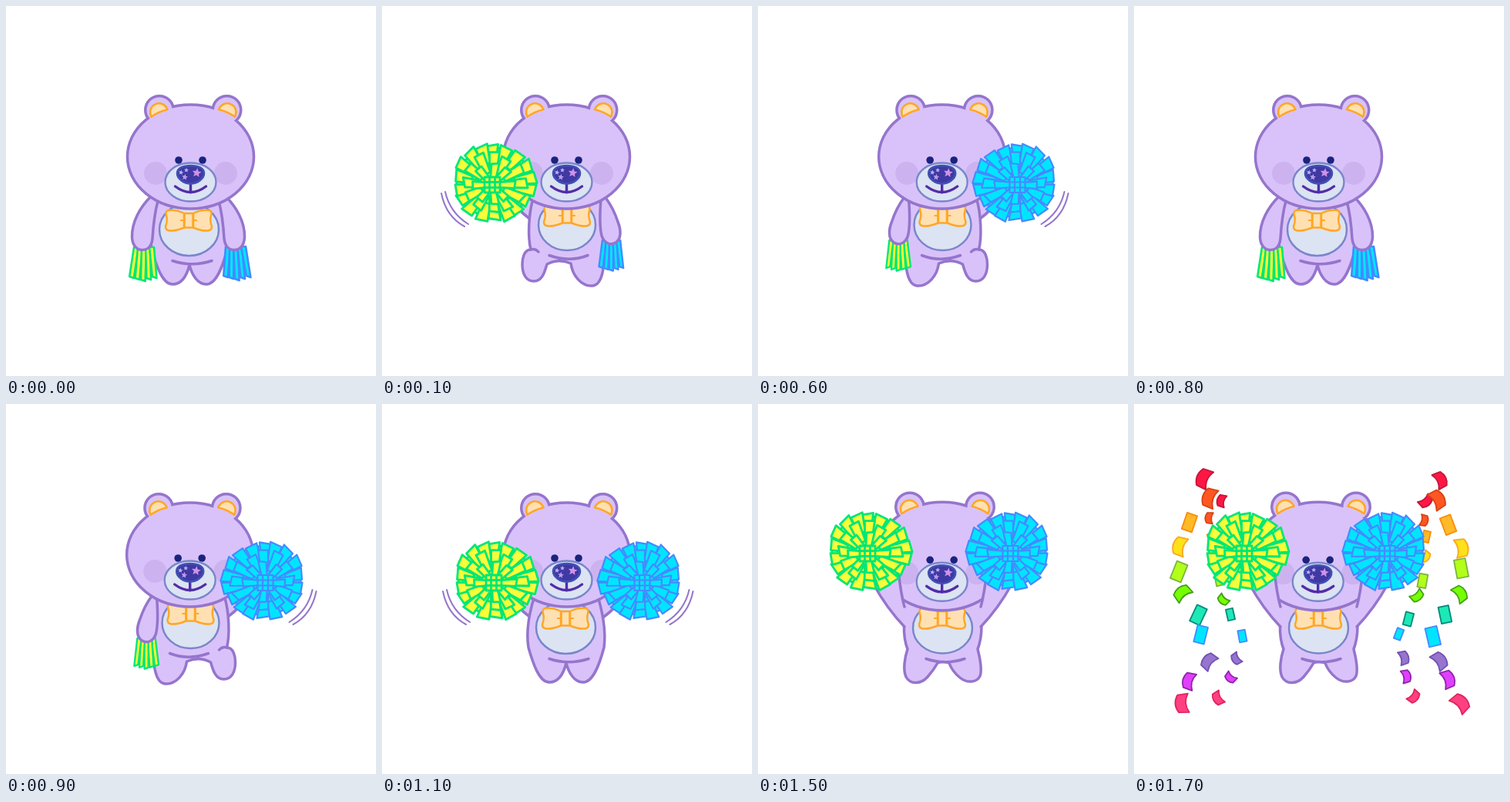
Write an HTML page that moves like this. It is 480x480 px and loops after 2000 ms.

```html
<!DOCTYPE html>
<html lang="en">
<head>
<meta charset="utf-8">
<title>Cheering bear</title>
<style>
html, body { margin: 0; width: 100%; height: 100%; overflow: hidden; background: #fff; }
svg { display: block; width: 100%; height: 100%; }
</style>
</head>
<body>
<svg id="stage" viewBox="0 0 480 480" stroke-linecap="round" stroke-linejoin="round"></svg>
<script>
const FUR = '#d9c2f9', LINE = '#9575cd', CREAM = '#ffe0b2', ORANGE = '#ffa726';
const PALE = '#dce3f2', SLATE = '#7986cb', INK = '#512da8', NAVY = '#1a237e', BLUSH = '#cdb2f0';
const YELLOW = { fill: '#f6fd3a', line: '#00e676', width: 2.8 };
const BLUE = { fill: '#00e5ff', line: '#448aff', width: 2.2 };

const path = (d, fill, line = 'none', w = 3.5) =>
  `<path d="${d}" fill="${fill}" stroke="${line}" stroke-width="${w}"/>`;
const oval = (x, y, rx, ry, fill, line = 'none', w = 3.5) =>
  `<ellipse cx="${x}" cy="${y}" rx="${rx}" ry="${ry}" fill="${fill}" stroke="${line}" stroke-width="${w}"/>`;
const at = (x, y, inner, more = '') => `<g transform="translate(${x} ${y}) ${more}">${inner}</g>`;
const fur = d => path(d, FUR, LINE);
const line = (d, w = 3.5, color = LINE) => path(d, 'none', color, w);
const mirror = (inner, axis = 239.75) => at(axis * 2, 0, inner, 'scale(-1 1)');
const both = (inner, axis) => inner + mirror(inner, axis);
const poly = pts => 'M' + pts.map(p => p.map(v => v.toFixed(1)).join(' ')).join('L') + 'Z';

function seeded(s) {
  return () => (s = (s * 16807) % 2147483647) / 2147483647;
}

// Pompom: three rings of paper strips, outermost first, and a small grid
const pomPaths = (() => {
  const rand = seeded(77), out = [];
  const spot = (a, r, side) => {
    const x = Math.cos(a) * r - Math.sin(a) * side;
    const y = Math.sin(a) * r + Math.cos(a) * side;
    return [x + r * .045, y * .95 - r * .06];
  };
  const ring = (n, r0, r1, w0, w1, vary) => {
    for (let i = 0; i < n; i++) {
      const a = (i + (rand() - .5) * .3) / n * 2 * Math.PI - Math.PI / 2;
      const end = r1 + (rand() - .5) * vary, slant = (rand() - .5) * vary * .5;
      out.push(poly([spot(a, r0, -w0), spot(a, end + slant, -w1), spot(a, end - slant, w1), spot(a, r0, w0)]));
    }
  };
  ring(18, 28, 53, 5, 8, 6);
  ring(12, 16, 40, 4.5, 6.5, 6);
  ring(8, 8, 27, 3.5, 5, 4);
  out.push('M-10-10H10V10H-10ZM-3.5-10V10M3.5-10V10M-10-3.5H10M-10 3.5H10');
  return out;
})();

function pom(x, y, c, flip) {
  const strips = pomPaths.map(d => path(d, c.fill, c.line, c.width)).join('');
  return at(x, y, oval(2, -3, 48, 45, c.fill, c.line, c.width) + strips, flip ? 'scale(-1 1)' : '');
}

function tassel(x, y, c, lean = 0, size = 1) {
  let strips = '';
  for (let k = -2; k <= 2; k++) {
    const top = k * 5, end = k * 7.4 + lean, h = 43 - Math.abs(k) * 2;
    strips += path(poly([[top - 3, 0], [end - 3, h - 1], [end + 2.6, h + 1], [top + 3, 0]]), c.fill, c.line, 2.6);
  }
  return at(x, y, strips, `scale(${size})`);
}

function star(x, y, r, color) {
  const pts = [];
  for (let i = 0; i < 10; i++) {
    const a = i * Math.PI / 5 - Math.PI / 2 + .15, q = i % 2 ? r * .45 : r;
    pts.push([x + Math.cos(a) * q, y + Math.sin(a) * q]);
  }
  return path(poly(pts), color);
}

function face() {
  const nose = 'M222 217C222 210 230 207 239.5 207S257 210 257 217S248 230.5 239.5 230.5S222 224 222 217Z';
  return both(oval(194, 217, 15, 15, BLUSH) + oval(224, 200, 4.8, 4.8, NAVY), 239.5) +
    oval(239.5, 228.5, 33, 25, PALE, SLATE, 2.4) +
    line('M239.5 230V242M219.5 234Q239.5 249 259.5 234', 3.4, INK) +
    path(nose, '#4039a3', '#3f51b5', 2.6) +
    star(247.5, 216.5, 6.3, '#ce93e8') + star(227, 216, 3.4, '#b9b0f5') +
    star(234, 213, 3.2, '#b9b0f5') + star(232, 222, 4.2, '#b99cf0');
}

// Outlines go first, fills on top, so ears and head share one contour
function head(big) {
  const parts = big
    ? [[197, 133.5, 16.5, 16.5], [288, 133.5, 16.5, 16.5], [239, 197.5, 83.5, 68.5]]
    : [[199, 135, 16.5, 16.5], [286.5, 135, 16.5, 16.5], [239.5, 195.5, 80.3, 65.7]];
  const dome = ([x, y], turn) =>
    at(x, y + 4, path('M-11.5 0C-11.5-17 11.5-17 11.5 0Q0-2-11.5 0Z', CREAM, ORANGE, 2.6), `rotate(${turn})`);
  return parts.map(p => oval(...p, FUR, LINE, 7)).join('') +
    parts.map(p => oval(...p, FUR)).join('') +
    dome(parts[0], -24) + dome(parts[1], 24) +
    at(big ? -.8 : 0, big ? 2.3 : 0, face());
}

function bow(x, y) {
  const wing = path('M-6-9Q-16-14-26-13Q-31-12-29-6Q-27 0-30 8Q-30 13-25 13.5Q-16 14-6 9.5Z', CREAM, ORANGE, 2.5) +
    line('M-6 0H-10', 2.2, ORANGE);
  return at(x, y, both(wing, 0) + path('M-5.5-9H5.5V9.5H-5.5Z', CREAM, ORANGE, 2.5));
}

const belly = (x, y, rx, ry) => oval(x, y, rx, ry, PALE, SLATE, 2.5);

function standBody() {
  return fur('M200 240Q184 285 189 316C195 337 203 361 216 361C229 361 235 348 238 336' +
      'C241 348 248 361 260 361C273 361 281 338 287 316Q291 285 276 240') +
    line('M216 330.5Q241 339 267 330.5') + belly(237.5, 290, 38.5, 34) + bow(237, 278);
}

function stand() {
  const arm = fur('M188 247C174 261 163 280 163.5 300C164 311 170 316.5 177 316.5C185 316.5 189 310 190 302C191 285 193 268 197 253');
  return standBody() + tassel(179, 313, YELLOW, -1) + tassel(298, 312, BLUE, 2) + both(arm, 236.5) + head();
}

const raisedArm = fur('M194 278Q172 262 158 238L176 226L202 252');
const swish = line('M77 243Q83 273 107 286M82 241Q88 268 112 283', 2);
const shake = color => pom(143, 232, color) + swish;

function waveBody(hanging) {
  return raisedArm +
    fur('M196 250C190 270 189 300 193 316C184 316 182 328 182 335C182 348 187 357 197 357C208 357 211 345 214 335' +
      'Q229 327 245 334C247 350 259 364 273 363C286 362 288 340 290 312Q293 280 283 245') +
    line('M192 316Q199 314 203 319M217 323.5Q243 333 267 323.5') +
    belly(240, 284, 37, 33) + bow(240, 272) + tassel(297.5, 304, hanging, 0, .9) +
    fur('M284 250C282 275 283 290 285 298C288 308 297 311 303 307C311 302 310 290 306 280C302 268 297 258 291 250');
}

const waveLeft = () => waveBody(BLUE) + head() + shake(YELLOW);
const waveRight = () => mirror(waveBody(YELLOW)) + at(-.8, 0, head()) + mirror(shake(BLUE));
const spread = () => both(raisedArm) + at(1, 0, standBody()) + head() +
  at(2, 0, shake(YELLOW)) + at(1, 0, mirror(shake(BLUE)));
const clap = () => at(1.5, 0, standBody()) + head(true) + pom(198, 269, YELLOW) + pom(272, 269, BLUE, true);

function cheer(shift = 0) {
  const arm = path('M150 234Q167 265 190 289L197 276L191 263Q185 245 182 215Z', FUR) +
    line('M150 234Q167 265 190 289M182 215Q185 245 190 263');
  return path('M189 290L192 250H288L290 290Z', FUR) +
    fur('M189.5 288Q189 305 194 318C190 330 188 345 192 354C198 365 212 363 220 354Q228 345 233 336Q240 333 248 336' +
      'Q252 347 262 355C272 363 284 361 288 353C291 345 288 330 285 318Q290 305 290 288') +
    line('M218 330.5Q243 339 268 330.5') + belly(239.5, 290.5, 38.5, 33) + bow(239, 278) +
    head(true) + both(arm, 239.5) +
    at(shift, 0, pom(142, 194, YELLOW) + pom(327.5, 194, BLUE, true));
}

const RECT = 'M-.31-.5H.31V.5H-.31Z';
const BEND = 'M-.36-.5L.2-.46Q.5 0 .2.46L-.36.5Q-.06 0-.36-.5Z';
const papers = [
  [BEND, '#ff1744', '#c2183a'], [BEND, '#ff5722', '#d84315'], [RECT, '#ffb929', '#fb8c00'],
  [BEND, '#ffe11a', '#f9a825'], [RECT, '#b2ff1a', '#7cb342'], [BEND, '#76ff03', '#43a018'],
  [RECT, '#1de9b6', '#00897b'], [RECT, '#00e5ff', '#448aff'], [BEND, '#9575cd', '#7351b5'],
  [BEND, '#e040fb', '#8e24aa'], [BEND, '#ff4081', '#e02460']
];

// Rainbow bands: on each side a large outer and a small inner piece per colour
const confetti = (() => {
  const rand = seeded(41), jitter = range => (rand() - .5) * range;
  const piece = ([shape, fill, edge], i, outer) => {
    const reach = outer ? 168 + 20 * Math.cos((i - 4) * .9) : 125 + 18 * Math.cos((i - 2) * .6);
    const tilt = (14 - 2 * i) * (outer ? -1 : 1);
    const size = (outer ? 23 : 16) + jitter(4);
    const turn = (outer ? -18 : 18) + jitter(shape === BEND ? 70 : 16);
    return at(reach + jitter(14), 110 + 27.4 * i + tilt + jitter(8),
      path(shape, fill, edge, 1.8 / size), `rotate(${turn}) scale(${size})`);
  };
  const side = () => papers.map((p, i) => piece(p, i, true) + piece(p, i, false)).join('');
  return at(241, 0, side() + mirror(side(), 0));
})();

const party = drop => at(0, drop, confetti) + cheer(1);

const LOOP = 2000;
const steps = [
  [0, stand], [100, waveLeft], [300, stand], [400, waveLeft],
  [600, waveRight], [800, stand], [900, waveRight], [1100, spread],
  [1300, clap], [1500, cheer], [1600, () => party(-16)], [1700, () => party(0)]
].map(([start, draw]) => ({ start, picture: draw() }));

const stage = document.getElementById('stage');
const origin = performance.now();
let shown = null;

function update(now) {
  const t = Math.max(0, now - origin) % LOOP;
  const step = steps.filter(s => s.start <= t).pop();
  if (step !== shown) {
    stage.innerHTML = step.picture;
    shown = step;
  }
  requestAnimationFrame(update);
}
update(origin);
</script>
</body>
</html>
```
